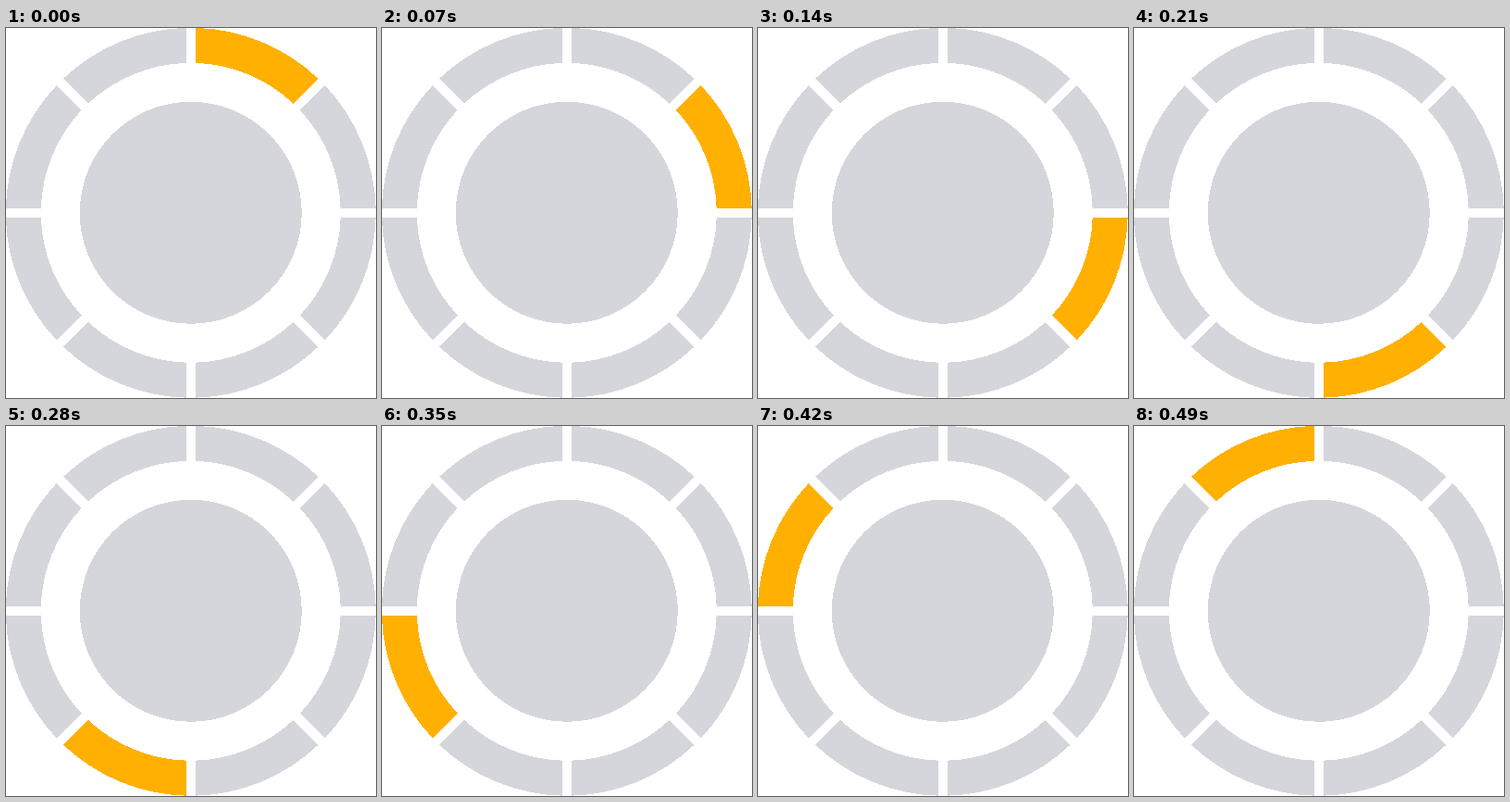
An HTML page for the animation above (560 ms loop, 400 px wide and 400 px high).

```html
<!DOCTYPE html>
<html lang="en">
<head>
<meta charset="utf-8">
<title>Ring spinner</title>
<style>
  html, body { margin: 0; width: 100%; height: 100%; overflow: hidden; background: #fff; }
  svg { display: block; width: 100vw; height: 100vh; fill: #d5d6dc; shape-rendering: crispEdges; }
</style>
</head>
<body>
<svg viewBox="-199.75 -199.75 400 400">
  <circle r="120"/>
</svg>
<script>
  const COUNT = 8, STEP = 70;
  const OUTER = 200, INNER = 162, HALF_GAP = 5;
  const IDLE = '#d5d6dc', ACTIVE = '#ffb000';
  const svg = document.querySelector('svg');

  // Ends of one segment, with edges parallel to the spokes so the gaps keep one width.
  function segmentEnds(radius) {
    const along = Math.sqrt(radius ** 2 - HALF_GAP ** 2);
    const s = Math.SQRT1_2;
    return {
      start: [HALF_GAP, -along],
      end: [(along - HALF_GAP) * s, -(along + HALF_GAP) * s]
    };
  }

  const outer = segmentEnds(OUTER), inner = segmentEnds(INNER);
  const shape = `M${outer.start}A${OUTER},${OUTER} 0 0 1 ${outer.end}` +
    `L${inner.end}A${INNER},${INNER} 0 0 0 ${inner.start}Z`;

  for (let i = 0; i < COUNT; i++) {
    const segment = document.createElementNS(svg.namespaceURI, 'path');
    segment.setAttribute('d', shape);
    segment.setAttribute('transform', `rotate(${i * 360 / COUNT})`);
    svg.append(segment);
    segment.animate([
      { fill: ACTIVE, offset: 0, easing: 'step-end' },
      { fill: IDLE, offset: 1 / COUNT, easing: 'step-end' },
      { fill: IDLE, offset: 1 }
    ], { duration: COUNT * STEP, delay: (i - COUNT) * STEP, iterations: Infinity });
  }
</script>
</body>
</html>
```
